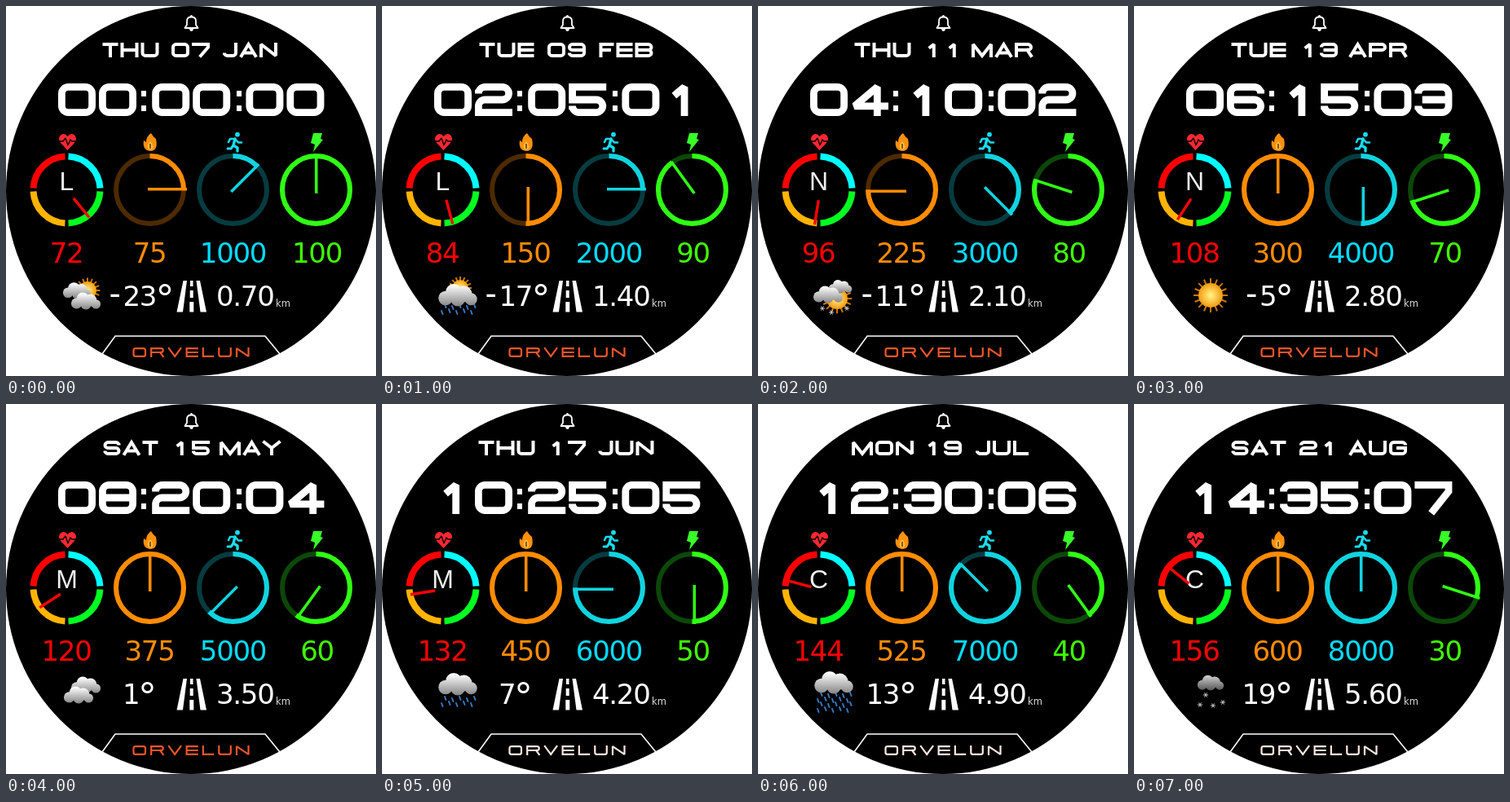
Write an HTML page with a canvas that moves like this. It is 454 px wide and 454 px high and loops after 8000 ms.

```html
<!DOCTYPE html>
<html lang="en">
<head>
<meta charset="utf-8">
<title>Watch face</title>
<style>
html, body { margin: 0; width: 100%; height: 100%; overflow: hidden; background: #fff; }
canvas { display: block; width: 454px; height: 454px; }
</style>
</head>
<body>
<canvas id="face" width="454" height="454"></canvas>
<script>
const ctx = document.getElementById('face').getContext('2d');
const TAU = Math.PI * 2;
const ORANGE = '#ff8c00', CYAN = '#10d4e0', GREEN = '#30ff14', RED = '#ff0000';

// Stroke font: letters a-y name the points of a 5 x 5 grid, capitals are rounded corners.
const GLYPHS = {
  0: 'cEYUAc', 1: 'gcw', 2: 'fAEOKuy', 3: 'fAEYUp lo', 4: 'xdpt', 5: 'eakOYUp',
  6: 'jEAUYOk', 7: 'aejw', 8: 'cEYUAc ko', 9: 'pUYEAKo',
  A: 'ucy qs', B: 'kaEOkOYuk', E: 'eauy ko', F: 'eau kn', G: 'jEAUYom', H: 'au ey ko',
  J: 'eYUp', L: 'auy', M: 'uawey', N: 'uaye', O: 'cEYUAc', P: 'uaEOk', R: 'uaEOk ny',
  S: 'jEAKOYUp', T: 'ae cw', U: 'aUYe', V: 'awe', Y: 'am em mw'
};
const WIDTHS = { A: 21, E: 20, F: 18, J: 18, L: 19, M: 26, S: 21, T: 19 };

function glyph(ch, x, y, w, h, lw) {
  if (ch === '1') x += w * 0.08;
  const at = c => {
    const n = c.toLowerCase().charCodeAt(0) - 97;
    return [x + lw / 2 + (w - lw) * (n % 5) / 4, y + lw / 2 + (h - lw) * Math.floor(n / 5) / 4];
  };
  ctx.lineWidth = lw;
  ctx.lineCap = 'square';
  ctx.lineJoin = 'miter';
  ctx.miterLimit = 2;
  ctx.beginPath();
  for (const part of GLYPHS[ch].split(' ')) {
    [...part].forEach((c, i) => {
      const p = at(c);
      if (!i) ctx.moveTo(...p);
      else if (c < 'a') ctx.arcTo(...p, ...at(part[i + 1]), h * 0.2);
      else ctx.lineTo(...p);
    });
  }
  ctx.stroke();
}

function word(str, cx, y, h, lw, gap, scale = 1) {
  const widths = [...str].map(c => (WIDTHS[c] || 22) * scale);
  let x = cx - (widths.reduce((a, b) => a + b) + gap * (str.length - 1)) / 2;
  [...str].forEach((c, i) => {
    glyph(c, x, y, widths[i], h, lw);
    x += widths[i] + gap;
  });
}

function text(str, x, y, color, size = 34, align = 'left', font = '"DejaVu Sans"') {
  ctx.font = `${size}px ${font}, sans-serif`;
  ctx.letterSpacing = size === 34 ? '-1.3px' : '0px';
  ctx.textAlign = align;
  ctx.fillStyle = color;
  ctx.fillText(str, x, y);
}

function line(points, color, width, cap = 'butt') {
  ctx.beginPath();
  points.forEach(p => ctx.lineTo(...p));
  ctx.strokeStyle = color;
  ctx.lineWidth = width;
  ctx.lineCap = cap;
  ctx.lineJoin = cap === 'round' ? 'round' : 'miter';
  ctx.stroke();
}

function fillPath(d, color) {
  ctx.fillStyle = color;
  ctx.fill(new Path2D(d));
}

function disc(x, y, r, color) {
  ctx.beginPath();
  ctx.arc(x, y, r, 0, TAU);
  ctx.fillStyle = color;
  ctx.fill();
}

function arc(x, r, from, to, color, width) {
  ctx.beginPath();
  ctx.arc(x, 225.5, r, from - TAU / 4, to - TAU / 4);
  ctx.strokeStyle = color;
  ctx.lineWidth = width;
  ctx.lineCap = 'butt';
  ctx.stroke();
}

function needle(x, y, angle, from, to, side, color, width) {
  ctx.save();
  ctx.translate(x, y);
  ctx.rotate(angle);
  line([[side, -from], [side, -to]], color, width);
  ctx.restore();
}

function gauge(x, part, color, dim) {
  const angle = Math.min(part, 1) * TAU;
  arc(x, 41.5, 0, TAU, dim, 6);
  arc(x, 41.5, 0, angle, color, 6);
  needle(x + 1.5, 226, angle, -4, 44, -1.3, color, 3.6);
}

function heartZone(rate, letter) {
  ['#00ffff', '#00ff20', '#ffb400', RED].forEach((c, i) =>
    arc(74.5, 41, i * TAU / 4 + 0.05, (i + 1) * TAU / 4 - 0.05, c, 8));
  text(letter, 74.5, 226, '#f0f0f0', 32, 'center', '"Liberation Sans"');
  needle(76, 227.3, (2 * rate - 3) * TAU / 360, 11, 41.5, 0, RED, 3.4);
}

function bell() {
  ctx.strokeStyle = '#fff';
  ctx.lineWidth = 1.8;
  ctx.lineJoin = 'round';
  ctx.stroke(new Path2D('M219.5 27H235.5L233 23V18.5Q233 13.5 227.5 13.5T222 18.5V23Z'));
  disc(227.5, 12.5, 1.5, '#fff');
  fillPath('M225 28h5q-.5 3-2.5 3t-2.5-3', '#fff');
}

function icons() {
  fillPath('M75.5 177L67 168Q63 162 67 158.5Q72 155 75.5 160Q80 155 84 158.5Q88 162 84 168Z', '#ff2832');
  line([[64, 166], [70, 166], [73, 162], [76, 171], [79, 164], [81, 166], [87, 166]], '#000', 1.4);
  fillPath('M178 156Q180 160 184 163Q187 178 177 178Q167 177 169 165L172 167Q172 160 178 156', '#ff9010');
  fillPath('M177 166Q182 172 179 176H175Q172 171 177 166', '#ffc040');
  line([[177, 169], [177, 175]], '#603000', 1.5);

  const limb = '#18dcf0';
  disc(284, 157.7, 2.9, limb);
  line([[281, 163], [279, 171], [284, 174], [284, 178]], limb, 3.4, 'round');
  line([[273, 167], [275, 163], [281, 163], [285, 167.5], [289, 167.5]], limb, 2.6, 'round');
  line([[279, 171], [276, 175], [272, 175]], limb, 3, 'round');
  fillPath('M377 156h11l-2 7 3 1L377 179l2-9-5-2Z', '#38ff28');
}

function road() {
  fillPath('M217.5 337H222L217 375.5H209.5ZM233.5 337H238L246 375.5H238.5Z', '#fff');
  fillPath('M226 337h3.5v7h-3.5ZM225.7 349h4v9h-4ZM225.3 363h5v12.5h-5Z', '#fff');
}

function cloud(x, y, s, dark = '#858585', light = '#fff') {
  const shade = ctx.createLinearGradient(0, y - 11 * s, 0, y + 10 * s);
  shade.addColorStop(0, light);
  shade.addColorStop(1, dark);
  [[-12, 2, 7], [-4, -4, 8], [6, -2, 8], [13, 3, 6], [0, 3, 7]].forEach(([dx, dy, r]) =>
    disc(x + dx * s, y + dy * s, r * s, shade));
}

function sun(x, y, r) {
  for (let i = 0; i < 16; i++) {
    const a = i * TAU / 16, k = r * 1.4;
    line([[x, y], [x + k * Math.cos(a), y + k * Math.sin(a)]], '#c87800', 2);
  }
  const glow = ctx.createRadialGradient(x, y, 1, x, y, r);
  glow.addColorStop(0, '#fff080');
  glow.addColorStop(1, '#f59a10');
  disc(x, y, r, glow);
}

function rain(y, rows) {
  for (let i = 0; i < rows * 5; i++) {
    const row = Math.floor(i / 5);
    const x = 77 + i % 5 * 9 - row % 2 * 4, top = y + row * 6 + i % 2 * 2;
    line([[x, top], [x + 1.5, top + 4]], '#3878c0', 2, 'round');
  }
}

function flake(x, y, r = 3) {
  for (let i = 0; i < 3; i++) {
    const dx = r * Math.cos(i * TAU / 6), dy = r * Math.sin(i * TAU / 6);
    line([[x - dx, y - dy], [x + dx, y + dy]], '#ccc', 1);
  }
}

const WEATHER = [
  () => { sun(100, 349, 11); cloud(87, 350, 0.9); cloud(98, 363, 0.95); },
  () => { sun(96, 346, 10); rain(366, 2); cloud(93, 356, 1.25); },
  () => {
    sun(97, 359, 13);
    cloud(101, 345, 0.75);
    cloud(86, 355, 0.95);
    flake(79, 371);
    flake(90, 376);
    flake(109, 371);
  },
  () => sun(94, 355, 15),
  () => { cloud(98, 346, 0.95); cloud(89, 358, 0.95); },
  () => { rain(359, 2); cloud(93, 345, 1.25); },
  () => { rain(354, 4); cloud(93, 343, 1.25); },
  () => {
    cloud(94, 343, 0.85, '#555', '#ccc');
    flake(81, 369);
    flake(88, 357);
    flake(97, 370);
    flake(109, 366);
  }
];

function temperature(value) {
  const digits = String(Math.abs(value)), minus = value < 0 ? 22 : 0;
  const x = 162 + (minus - digits.length * 21 - 17) / 2;
  if (minus) text('-', x - 17, 367, '#fff', 40);
  text(digits, x, 368, '#fff');
  text('°', x + digits.length * 21 - 2, 375, '#fff', 46);
}

function clock(i) {
  ctx.strokeStyle = ctx.fillStyle = '#fff';
  [2 * i, 5 * i, i].forEach((n, k) => {
    const [tens, units] = String(n).padStart(2, '0');
    const x = 64 + k * 115.2;
    glyph(tens, x, 95, 46, 40, 8.8);
    glyph(units, x + 50, 95, 46, 40, 8.8);
    if (k) {
      ctx.fillRect(49 + k * 117, 104, 6, 7);
      ctx.fillRect(49 + k * 117, 122, 6, 7);
    }
  });
}

const DAYS = ['THU', 'TUE', 'THU', 'TUE', 'SAT', 'THU', 'MON', 'SAT'];
const MONTHS = ['JAN', 'FEB', 'MAR', 'APR', 'MAY', 'JUN', 'JUL', 'AUG'];

function draw(i) {
  ctx.fillStyle = '#fff';
  ctx.fillRect(0, 0, 454, 454);
  disc(227, 227, 227, '#000');

  if (i < 7) bell();
  ctx.strokeStyle = '#fff';
  word(DAYS[i], 153, 45, 18, 4, 3);
  word(String(7 + 2 * i).padStart(2, '0'), 226.5, 45, 18, 4, 3);
  word(MONTHS[i], 299.5, 45, 18, 4, 3);
  clock(i);
  icons();

  const rate = 72 + 12 * i, calories = 75 * (i + 1), steps = 1000 * (i + 1), battery = 100 - 10 * i;
  heartZone(rate, 'LLNNMMCC'[i]);
  gauge(176.5, calories / 300, ORANGE, '#4d2a00');
  gauge(278.5, steps / 8000, CYAN, '#063c40');
  gauge(380.5, battery / 100, GREEN, '#0c4808');
  text(rate, 74, 315, RED, 34, 'center');
  text(calories, 176, 315, ORANGE, 34, 'center');
  text(steps, 278.5, 315, '#00dcff', 34, 'center');
  text(battery, 381.5, 315, '#40ff00', 34, 'center');

  WEATHER[i]();
  temperature(-23 + 6 * i);
  road();
  text((0.7 * (i + 1)).toFixed(2), 258, 368, '#fff');
  text('km', 331, 369, '#ddd', 11.5);

  line([[118, 427], [134, 405], [318, 405], [336, 427]], '#fff', 1.6);
  ctx.strokeStyle = i < 5 ? '#f0562a' : '#ffe8e0';
  word('ORVELUN', 227, 419, 12, 2.2, 5, 0.76);
}

function tick() {
  draw(Math.floor(performance.now() / 1000) % 8);
  requestAnimationFrame(tick);
}
tick();
</script>
</body>
</html>
```
